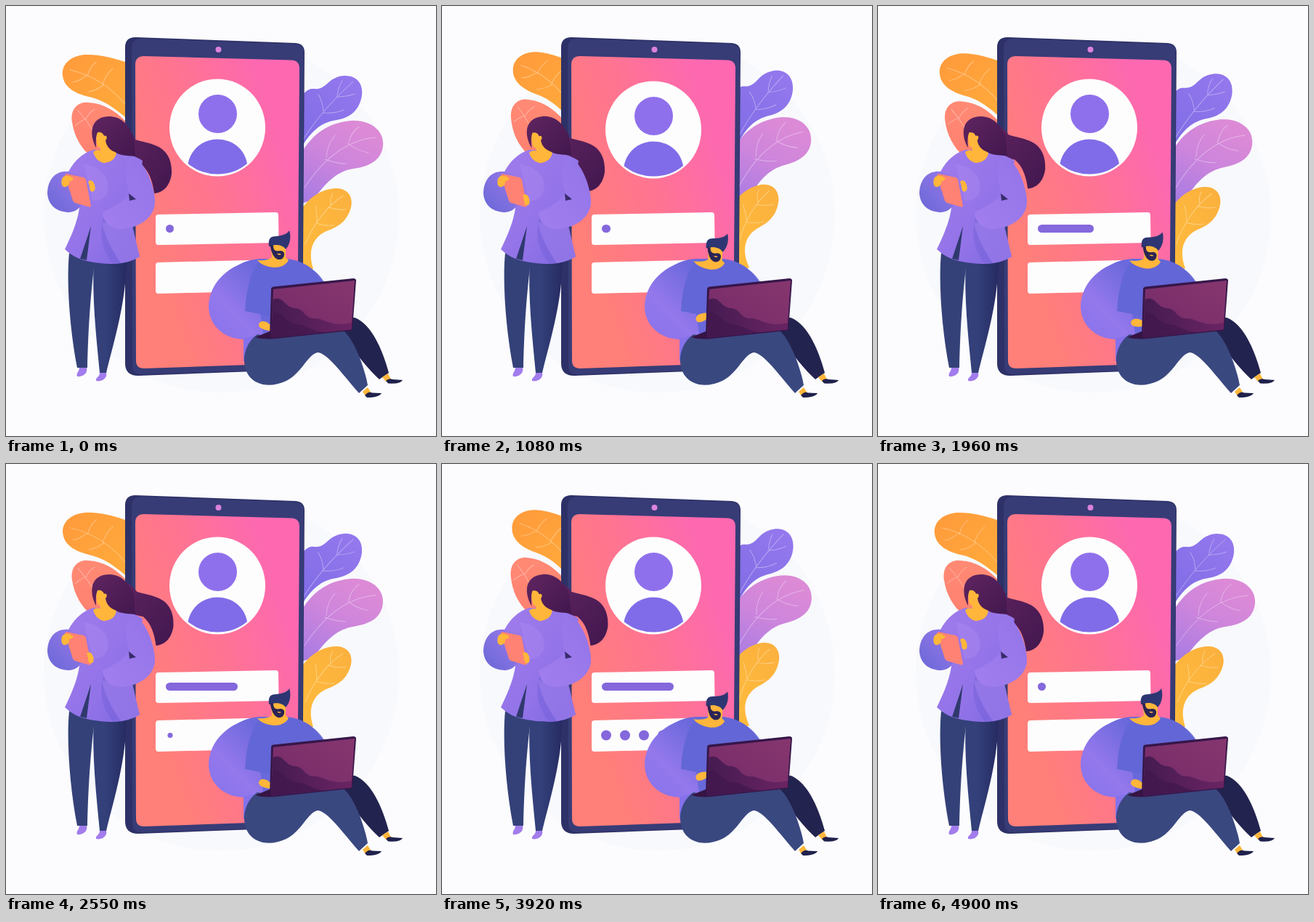
Write an HTML page that moves like this. It is 592 px wide and 592 px high and loops after 5000 ms.

```html
<!DOCTYPE html>
<html lang="en">
<head>
<meta charset="utf-8">
<title>Sign-in illustration</title>
<style>
html, body { margin: 0; width: 100%; height: 100%; overflow: hidden; background: #fcfcfe; }
svg { display: block; width: 100vw; height: 100vh; }
.vein { fill: none; stroke: #fff; stroke-opacity: .36; stroke-width: 1; stroke-linecap: round; }
.skin { fill: #ffb63a; }
</style>
</head>
<body>
<svg viewBox="0 0 592 592">
<defs>
  <linearGradient id="screen" gradientUnits="userSpaceOnUse" x1="190" y1="305" x2="400" y2="235">
    <stop offset="0" stop-color="#ff7f79"/><stop offset=".5" stop-color="#ff7491"/><stop offset="1" stop-color="#fd68b1"/>
  </linearGradient>
  <linearGradient id="amber" x1="0" y1="0" x2="1" y2="1">
    <stop offset="0" stop-color="#ff9a3c"/><stop offset="1" stop-color="#ffae3a"/>
  </linearGradient>
  <linearGradient id="coral" x1="0" y1="0" x2="0" y2="1">
    <stop offset="0" stop-color="#ff8a74"/><stop offset="1" stop-color="#ff8070"/>
  </linearGradient>
  <linearGradient id="violet" x1="0" y1="1" x2="1" y2="0">
    <stop offset="0" stop-color="#7c6ae4"/><stop offset="1" stop-color="#9679ee"/>
  </linearGradient>
  <linearGradient id="rose" x1="0" y1="1" x2=".6" y2="0">
    <stop offset="0" stop-color="#a27ae4"/><stop offset=".6" stop-color="#cd85dc"/><stop offset="1" stop-color="#dc8ad6"/>
  </linearGradient>
  <linearGradient id="gold" x1="0" y1="1" x2="1" y2="0">
    <stop offset="0" stop-color="#ffbc3c"/><stop offset="1" stop-color="#fbb03e"/>
  </linearGradient>
  <linearGradient id="hair" x1="0" y1="0" x2="1" y2="1">
    <stop offset="0" stop-color="#602560"/><stop offset="1" stop-color="#42174f"/>
  </linearGradient>
  <linearGradient id="knit" x1="0" y1="0" x2="1" y2="1">
    <stop offset="0" stop-color="#a07cec"/><stop offset=".6" stop-color="#9273e8"/><stop offset="1" stop-color="#7b66de"/>
  </linearGradient>
  <linearGradient id="cuff" x1="0" y1="1" x2="1" y2="0">
    <stop offset="0" stop-color="#6867d6"/><stop offset="1" stop-color="#9e7bec"/>
  </linearGradient>
  <linearGradient id="sleeve" x1="1" y1="0" x2="0" y2="1">
    <stop offset="0" stop-color="#9274e8"/><stop offset="1" stop-color="#a27eee"/>
  </linearGradient>
  <linearGradient id="legR" x1=".35" y1="0" x2="1" y2="0">
    <stop offset="0" stop-color="#33407a"/><stop offset="1" stop-color="#262b62"/>
  </linearGradient>
  <linearGradient id="arm" x1="0" y1="1" x2=".7" y2="0">
    <stop offset="0" stop-color="#8672ec"/><stop offset=".45" stop-color="#9478ec"/><stop offset="1" stop-color="#6c69dc"/>
  </linearGradient>
  <linearGradient id="lid" x1="0" y1="1" x2="1" y2="0">
    <stop offset="0" stop-color="#742a68"/><stop offset="1" stop-color="#86366e"/>
  </linearGradient>
  <linearGradient id="wave" x1="0" y1="0" x2="1" y2="0">
    <stop offset="0" stop-color="#451b52"/><stop offset="1" stop-color="#6a2463"/>
  </linearGradient>
</defs>

<rect width="592" height="592" fill="#fcfcfe"/>
<circle cx="296.5" cy="288" r="244.5" fill="#f8f9fc"/>

<!-- leaves -->
<g id="leafA">
  <path fill="url(#amber)" d="M178 82C152 72 128 66 108 67C88 69 76 81 78 96C80 113 97 121 114 125C134 129 150 141 164 153L182 168Z"/>
  <path class="vein" d="M88 88C118 94 146 112 170 142M112 97C114 88 118 82 124 77M133 108C136 98 140 92 147 86M110 96C104 101 98 104 92 105M134 109C126 115 121 117 114 118"/>
</g>
<g id="leafB">
  <path fill="url(#coral)" d="M91 160C88 142 99 131 114 133C134 134 150 144 164 158L164 214L118 208C104 197 94 180 91 160Z"/>
  <path class="vein" d="M99 144C112 158 124 176 130 196M110 156C113 149 117 145 122 142M108 156C102 159 99 161 95 165"/>
</g>
<g id="leafC">
  <path fill="url(#violet)" d="M398 140C408 120 415 113 424 114C442 116 442 98 465 96C482 95 492 106 490 123C487 143 474 154 455 157C434 160 420 172 406 196L392 206Z"/>
  <path class="vein" d="M478 104C456 124 434 146 410 182M456 123C457 115 459 109 463 103M437 145C436 134 434 128 430 122M455 125C464 125 472 124 480 121M436 147C446 148 456 147 465 143"/>
</g>
<g id="leafD">
  <path fill="url(#rose)" d="M400 215C416 180 440 161 474 158C502 156 521 172 519 192C517 214 498 221 478 224C454 228 440 245 428 260C420 269 412 271 398 273Z"/>
  <path class="vein" d="M509 181C472 184 440 206 411 250M472 188C474 178 479 171 486 166M441 208C442 196 446 186 453 178M471 189C480 197 489 200 499 202M439 211C450 215 459 217 468 217"/>
</g>
<g id="leafE">
  <path fill="url(#gold)" d="M402 287C414 266 432 252 454 251C472 251 478 264 475 277C470 296 458 304 441 310C425 317 414 334 423 362L404 364Z"/>
  <path class="vein" d="M464 261C444 274 424 298 412 328M447 274C446 268 447 263 450 258M428 297C428 288 428 284 426 275M444 277C452 280 460 281 468 280M427 299C436 302 444 303 452 302"/>
</g>

<!-- phone -->
<path fill="#2e3167" d="M164 57Q164 43 178 43L399 51Q411 52 411 64L408 484Q408 500 396 501L182 509Q164 509 164 492Z"/>
<path fill="#373c76" d="M173 59Q173 45 186 45L398 52.500Q410 53 410 65L407 484Q407 499 396 500L186 507Q174 507 174 494Z"/>
<path fill="url(#screen)" d="M178 81Q178 69 190 69L393 74.500Q404 75 404 86L401 480Q401 491 391 492L190 499Q179 499 179 488Z"/>
<circle cx="292.500" cy="60" r="4" fill="#dc82dc"/>

<g id="avatar">
  <ellipse cx="291" cy="167.500" rx="66" ry="67" fill="#fefdfe"/>
  <circle cx="291.500" cy="148.500" r="26.500" fill="#8f70ec"/>
  <path fill="#806ce8" d="M250.500 217C255 195 273 183.500 291 183.500C310 183.500 328 195 332 217Q315 231.500 291 231.500Q267 231.500 250.500 217Z"/>
</g>

<path fill="#fefdfe" d="M206 291Q206 287 210 287L371 284Q375 284 375 288L375.500 322Q375.500 326 371 326L210 329Q206 329 206 325Z"/>
<path fill="#fefdfe" d="M206 357Q206 353 210 353L371 349Q375 349 375 353L375.500 388Q375.500 392 371 392L210 396Q206 396 206 392Z"/>
<rect id="line" x="220" y="301" width="11" height="11" rx="5.500" fill="#8468dc"/>
<g id="dots" fill="#8468dc"></g>

<!-- standing figure -->
<path fill="#344178" d="M87 340C83 380 88 446 98 498L112 498C113 456 115 410 122 352Z"/>
<path fill="url(#legR)" d="M121 345C118 400 124 452 129 505L138 505C150 456 166 406 166 345Z"/>
<path fill="#a27cec" d="M101 498L111 498C113 506 105 511 98 510C96 506 101 503 101 498ZM129 505L138 505C140 512 132 518 124 516C123 511 129 511 129 505Z"/>
<path id="tail" fill="url(#hair)" d="M146 165C160 166 169 174 178 184C188 187 197 188 206 192C222 198 229 213 228 231C226 247 217 257 204 258C202 243 198 228 186 218C170 215 152 210 144 192Z"/>
<path fill="url(#knit)" d="M120 198C105 203 95 212 86 228C92 250 100 262 101 278C98 300 88 320 81 335Q92 345 104 349C118 353 132 355 150 355Q170 354 184 345C180 330 177 315 174 304L188 213C178 206 165 203 152 199Z"/>
<path fill="#7865dc" opacity=".6" d="M134 292C128 312 132 338 148 355Q170 354 184 345C180 330 177 315 174 304Z"/>
<path fill="#a583f0" opacity=".5" d="M132 298C136 318 146 336 158 354C170 352 178 349 184 345C180 330 177 315 174 302Z"/>
<path fill="#30396e" d="M117 303L102 348L111 350Z"/>
<path fill="url(#sleeve)" d="M172 206C190 211 204 245 205 268C206 290 184 306 158 307C144 307 134 298 133 284C150 276 163 268 170 258C164 240 162 220 172 206Z"/>
<path fill="#372c6c" d="M169 258L179 266L170 268Z"/>
<path fill="#aa86f0" opacity=".5" d="M107 218C124 218 141 232 141 249C140 262 130 270 119 268Z"/>
<path fill="url(#cuff)" d="M86 228C66 226 57 242 57 258C58 275 71 284 87 284C96 283 101 279 103 274L110 236Z"/>
<path fill="#ff8274" d="M83 231L107 236Q109 237 110 239L117 275Q117 277 114 276.500L95 271Q93 270 92 268L81 233Z"/>
<path class="skin" d="M77 238C79 233 85 232 91 236C94 238 92 241 87 241C88 245 85 250 79 249Q75 246 77 238Z"/>
<path id="finger" class="skin" d="M113 242C116 239 120 240 122 246C124 253 121 257 117 255C114 252 116 248 113 242Z"/>
<g id="headW">
  <path class="skin" d="M124 173L139 171L143 192L152 202C151 211 143 216 134 216Q123 213 120 201Q124 197 130 199L130 195Q125 194 125 187Z"/>
  <path fill="url(#hair)" d="M124 195C114 176 116 153 141 152C158 152 168 162 176 180L178 207C164 206 155 205 150 201C142 198 138 192 137 185C140 182 139 177 135 179C134 175 130 173 126 174C123 181 124 188 124 195Z"/>
</g>

<!-- seated figure -->
<path fill="#23234f" d="M462 430L480 429C503 438 518 472 527 505L514 514C496 498 476 470 458 446Z"/>
<path class="skin" d="M518 511L526 506L530 514L523 517Z"/>
<path fill="#1f214c" d="M523 516Q527 512 532 514L546 515Q543 521 526 519.500Z"/>
<path fill="#6a69dc" d="M350 348C320 350 300 365 300 400L327 459L327 482L348 460L420 450L440 386C430 366 412 350 386 348Z"/>
<path fill="#6066d4" opacity=".75" d="M345 351C334 374 330 396 329 421L367 428L367 387L440 383C432 368 414 352 388 349Z"/>
<path fill="url(#arm)" d="M343 350C309 354 280 380 279 413C279 440 300 458 327 459C338 459 348 456 354 451L350 424L329 420C330 394 336 370 347 352Z"/>
<path fill="#8571ea" d="M327 458L350 452L338 468L327 490Z"/>
<path fill="#3a4880" d="M346 452C328 465 323 490 333 507C343 523 365 526 386 516C408 505 416 478 430 477C445 480 466 511 486 533L498 522C493 494 477 454 462 445L365 456Z"/>
<path class="skin" d="M491 531L498 525L503 533L495 537Z"/>
<path fill="#1f214c" d="M494 536Q499 530 504 532.500L517 533Q514 539 497 539Z"/>
<g id="headM">
  <path class="skin" d="M364 326L385 326L385 346L389 350C385 357 378 360 369 360Q352 358 346 350Q361 351 366 346Z"/>
  <path fill="#2d3672" d="M362 331C361 321 363 317 372 317C381 316 387 314 390 309C393 318 391 329 385 335C382 329 371 328 367 330Z"/>
  <path fill="#2a2456" d="M363.500 329L368 330C368 337 372 338 377 337C381 336.500 384 339 383 343C382 349 377 350 373 348.500Q366 345 363.500 329Z"/>
  <path class="skin" d="M373 341.500Q376 340 379 342Q376 343.500 373 341.500Z"/>
</g>
<path fill="#361443" d="M343 456L368 446L365 458.500L352 458Z"/>
<path id="hand" class="skin" d="M349 436C353 432 359 434 365 440L365 447Q355 447 349 442Q347 439 349 436Z"/>
<path fill="#36164a" d="M365 390Q365 387 368 386.500L478 375Q482 375 482 378L477 444Q477 447 474 447L366 458.500Q363 458.500 363 455Z"/>
<path fill="url(#lid)" d="M368 390L480 378L475.500 445L365 456Z"/>
<path fill="url(#wave)" d="M367.500 404C382 398 383 414 397 416C412 417 409 429 424 430C440 430 446 443 476 436L475.500 445.500L365 457Z"/>
<path fill="#40184e" opacity=".7" d="M367 422C380 420 384 436 400 438C416 439 420 449 440 449L365 457Z"/>
</svg>

<script>
const LOOP = 5000, CYCLE = 4900, SWING = CYCLE / 2, SWIPE = CYCLE / 3;
const $ = id => document.getElementById(id);
const clamp = (v, a = 0, b = 1) => Math.min(b, Math.max(a, v));
const ease = p => (1 - Math.cos(Math.PI * clamp(p))) / 2;
const span = (t, a, b) => ease((t - a) / (b - a));
const move = (id, value) => $(id).setAttribute('transform', value);

// pivot and full swing angle of each leaf
const leaves = {
  leafA: [150, 250, 7.4],
  leafB: [170, 210, 4.5],
  leafC: [380, 200, -5],
  leafD: [430, 290, -6.3],
  leafE: [410, 360, -8]
};

const dots = [226, 252, 278, 304].map(x => {
  const c = document.createElementNS('http://www.w3.org/2000/svg', 'circle');
  c.setAttribute('cx', x);
  c.setAttribute('cy', 373.5);
  $('dots').append(c);
  return c;
});

function draw(t) {
  const s = (1 - Math.cos(2 * Math.PI * t / SWING)) / 2;
  const nod = Math.sin(s * Math.PI / 2);

  for (const id in leaves) {
    const [x, y, angle] = leaves[id];
    move(id, `rotate(${angle * s} ${x} ${y})`);
  }

  const bob = span(t, 480, 1150) - span(t, 1150, 1800);
  move('avatar', `translate(0 ${3 * bob})`);

  const typed = span(t, 980, 2450) - span(t, 4100, 4850);
  $('line').setAttribute('width', 11 + 88 * typed);
  dots.forEach((c, i) => {
    const on = 2450 + i * 130, off = 4400 - i * 110;
    c.setAttribute('r', 7 * (span(t, on, on + 200) - span(t, off, off + 200)));
  });

  // the hair lifts slowly, swaying left and then right
  const sway = -4 * span(t, 0, 1100) + 6.5 * span(t, 1100, 2100) - 2.5 * span(t, 2900, 4300);
  const lift = -8 * (span(t, 0, 2700) - span(t, 3900, CYCLE));
  move('headW', `rotate(${-3 * s} 138 205)`);
  move('tail', `translate(${sway} ${lift})`);

  const p = t % SWIPE / SWIPE;
  const swipe = span(p, .2, .36) - span(p, .66, .92);
  move('finger', `translate(${-2 * swipe} ${19 * swipe})`);

  move('headM', `translate(0 ${3 * nod}) rotate(${4 * nod} 372 354)`);
  move('hand', `translate(${s} ${-12 * s}) rotate(${-48 * s} 357 440)`);
}

const begin = performance.now();
function tick() {
  const t = (performance.now() - begin) % LOOP;
  draw(Math.min(t, CYCLE));
  requestAnimationFrame(tick);
}
tick();
</script>
</body>
</html>
```
